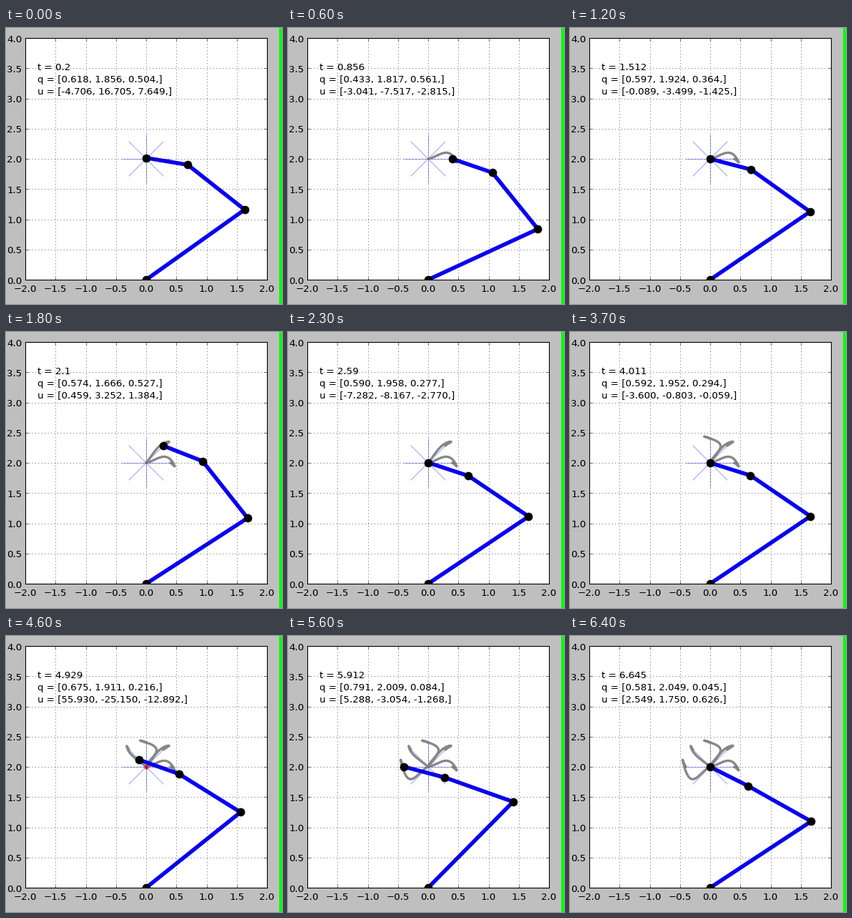
Write a matplotlib script that moves like this. It is 386 by 386 pixels and loops after 6.5 s.

```python
import numpy as np
import matplotlib.pyplot as plt
from matplotlib.animation import FuncAnimation
from matplotlib.patches import Rectangle

SIZE, DPI = 386, 80
FRAMES, STEP = 65, 100
LINKS = np.array([2.0, 1.2, 0.7])
HOME, START = np.array([0.0, 2.0]), np.array([-0.003, 2.016])
RADIUS = 0.4
FIRST, HALF = 0.25, 0.65     # first reach and time per half cycle
STIFF, DAMP = 700, 90        # hand controller gains

# Sideways swing and overshoot of each outward reach
SWAY = (0.1, 0.04, -0.17, 0.03, 0.2)
OVER = (0.17, 0.25, 0.1, 0.17, 0.14)

# Key points: frame index, simulation clock, direction of the last link
INDEX, CLOCK, LEAN = np.array([
    (0, 0.2, 2.977), (12, 1.512, 2.885), (23, 2.59, 2.825),
    (37, 4.011, 2.838), (46, 4.929, 2.766), (56, 5.912, 2.764),
    (64, 6.645, 2.675)]).T


def axes_of(k):
    """Unit vectors along and to the left of spoke k."""
    a = k * np.pi / 4
    return (np.array([np.cos(a), np.sin(a)]),
            np.array([-np.sin(a), np.cos(a)]))


def spoke(k):
    return HOME + RADIUS * axes_of(k)[0]


def reach(k, u):
    """Outward path: swing aside, overshoot, hook back to the goal."""
    u = np.asarray(u)[..., None]
    along, left = axes_of(k)
    ahead = RADIUS * (1 - (1 - u)**2) + OVER[k] * 4 * u**2 * (1 - u)
    side = SWAY[k] * (1.4 - u) * np.sin(2 * np.pi * u**1.5)
    return HOME + ahead * along + side * left


def phase(t):
    half = int(np.floor((t - FIRST) / HALF))
    elapsed = max(t - FIRST - half * HALF, 0)
    return half, 1 - np.exp(-(elapsed / 0.14)**1.5)


def goal_and_hand(t):
    half, s = phase(t)
    if half < 0:
        return HOME, START
    k = half // 2
    if half % 2 == 0:
        return spoke(k), reach(k, s)
    return HOME, spoke(k) + s * (HOME - spoke(k))


def solve(hand, phi):
    """Joint angles for a hand position and last-link direction."""
    l1, l2, l3 = LINKS
    x, y = hand - l3 * np.array([np.cos(phi), np.sin(phi)])
    c = (x * x + y * y - l1**2 - l2**2) / (2 * l1 * l2)
    q2 = np.arccos(np.clip(c, -1, 1))
    q1 = np.arctan2(y, x) - np.arctan2(l2 * np.sin(q2), l1 + l2 * np.cos(q2))
    return np.array([q1, q2, phi - q1 - q2])


def joints(q):
    a = np.cumsum(q)
    steps = LINKS[:, None] * np.column_stack([np.cos(a), np.sin(a)])
    return np.vstack([[0, 0], np.cumsum(steps, axis=0)])


def torques(points, goal, speed, noise):
    """Joint torques of a damped spring pulling the hand to its goal."""
    fx, fy = STIFF * (goal - points[-1]) - DAMP * speed + noise
    arms = points[-1] - points[:-1]
    return arms[:, 0] * fy - arms[:, 1] * fx


def state(i):
    t = np.interp(i, INDEX, CLOCK)
    goal, hand = goal_and_hand(t)
    speed = (hand - goal_and_hand(t - 0.002)[1]) / 0.002
    q = solve(hand, np.interp(i, INDEX, LEAN) - 0.3 * hand[0])
    points = joints(q)
    noise = np.random.default_rng(i).normal(0, 2, 2)
    return t, goal, points, q, torques(points, goal, speed, noise)


plt.rcParams.update({
    "font.family": "DejaVu Sans", "font.size": 12, "toolbar": "None",
    "text.hinting": "default", "text.kerning_factor": 6,
    "lines.scale_dashes": False, "axes.axisbelow": False,
    "axes.linewidth": 1.0})
fig = plt.figure(figsize=(SIZE / DPI, SIZE / DPI), dpi=DPI, facecolor="0.75")
fig.add_artist(Rectangle((381.5 / SIZE, 0), 5 / SIZE, 1, color="#00ff00", lw=0))
ax = fig.add_axes([27 / SIZE, 34 / SIZE, 338 / SIZE, 338 / SIZE])
ax.set(xlim=(-2, 2), ylim=(0, 4),
       xticks=np.arange(-2, 2.1, 0.5), yticks=np.arange(0, 4.1, 0.5))
ax.tick_params(direction="in", top=True, right=True, length=4, width=0.5)
ax.tick_params(axis="x", pad=5.5)
ax.tick_params(axis="y", pad=4)
ax.grid(True, color="black", linewidth=0.5, linestyle=(0, (1, 3)))

trail, = ax.plot([], [], color="0.53", lw=3, solid_capstyle="round",
                 solid_joinstyle="round")
dot, = ax.plot([], [], "o", color="#d8202c", ms=5.5, mew=0)
for k in range(8):
    ax.plot(*np.column_stack([HOME, spoke(k)]), color="blue", alpha=0.35,
            lw=1, zorder=1.9)
arm, = ax.plot([], [], "-o", color="#0800f0", lw=5, ms=10, mfc="black",
               mec="black", mew=0.5)
labels = [ax.text(-1.8, 3.47 - 0.205 * row, "") for row in range(3)]


def trail_points(t):
    half, s = phase(t)
    gap = np.full((1, 2), np.nan)
    parts = [gap]
    for k in range(half // 2 + 1):
        end = s if half == 2 * k else 1
        parts += [reach(k, np.linspace(0, end, 60)), gap]
    return np.vstack(parts)


def triple(v):
    return "[" + ", ".join(f"{x:.3f}" for x in v) + ",]"


def draw(i):
    t, goal, points, q, u = state(i)
    trail.set_data(*trail_points(t).T)
    dot.set_data(*goal[:, None])
    arm.set_data(*points.T)
    texts = f"t = {round(t, 3):g}", "q = " + triple(q), "u = " + triple(u)
    for label, text in zip(labels, texts):
        label.set_text(text)
    return [trail, dot, arm, *labels]


anim = FuncAnimation(fig, draw, frames=FRAMES, interval=STEP, repeat=True,
                     repeat_delay=0, blit=False)
plt.show()
```
